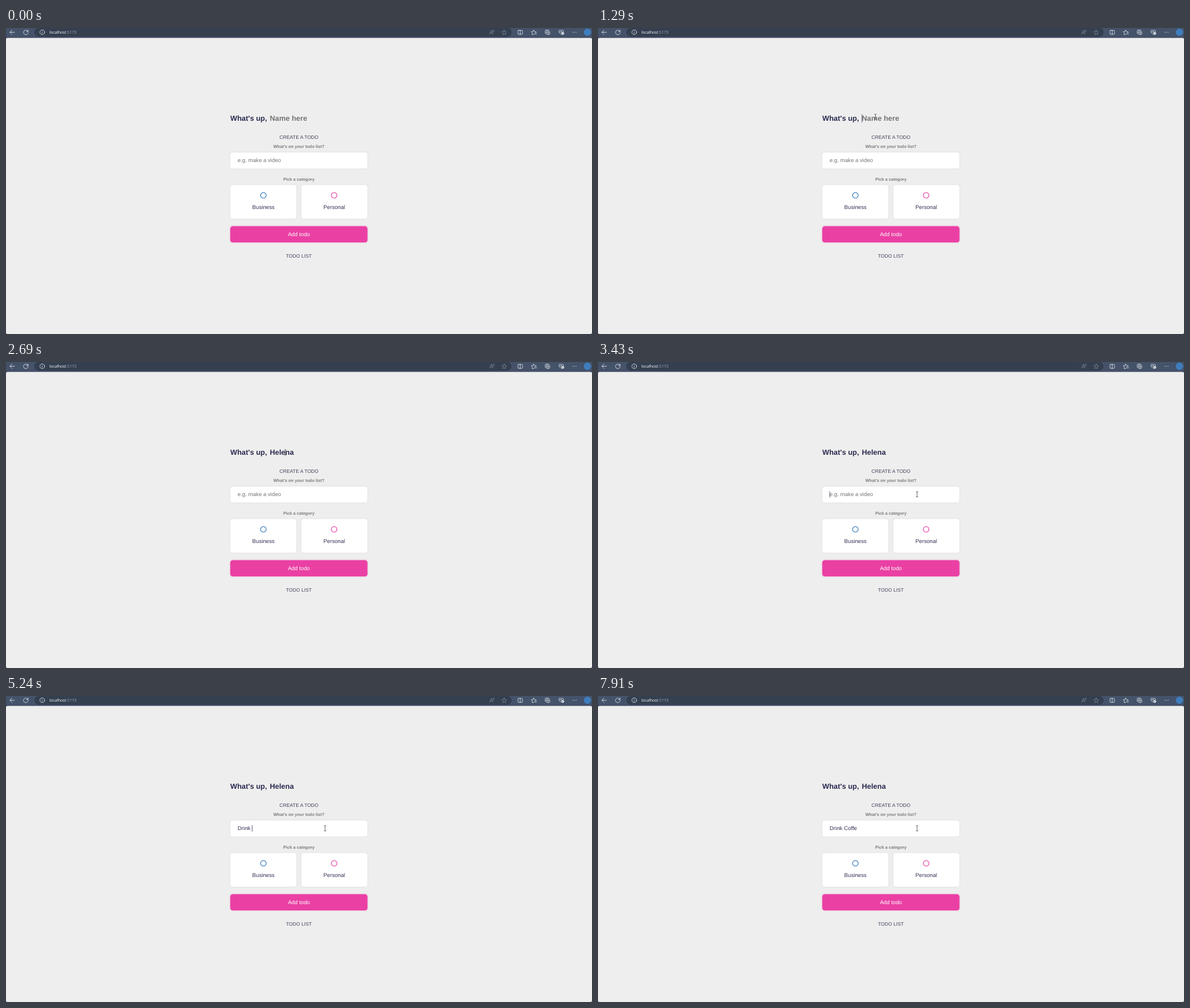
An HTML page for the animation above (8 s loop, 1034 px wide and 541 px high).

```html
<!DOCTYPE html>
<html lang="en">
<head>
<meta charset="utf-8">
<title>Todo list</title>
<style>
  html, body { margin: 0; width: 100%; height: 100%; overflow: hidden; background: #44536a; }
  svg { display: block; font-family: "Liberation Sans", Arial, sans-serif; text-rendering: geometricPrecision; }
  text { white-space: pre; fill: #313154; }
  .mid { text-anchor: middle; }
  .title { font-size: 12.92px; font-weight: bold; fill: #2b2b50; }
  .heading { font-size: 8.62px; letter-spacing: .04px; fill: #434360; }
  .label { font-size: 7.54px; font-weight: bold; fill: #7c7c7c; }
  .field { font-size: 9.69px; }
  .hint { fill: #757575; }
  .url { font: 7.1px "Open Sans", "Noto Sans", sans-serif; fill: #fff; }
  .card { fill: #fff; filter: drop-shadow(0 .5px .8px rgba(0, 0, 0, .1)); }
  .button { fill: #ea40a4; filter: drop-shadow(0 0 1.1px rgba(234, 64, 164, .65)); }
  .ring { fill: #fff; stroke-width: 1.2; }
  .icons { fill: none; stroke: #e4e8ee; stroke-width: .85; stroke-linecap: round; stroke-linejoin: round; }
  .dim { stroke: #7d8796; }
  .caret { fill: #313154; width: .8px; }
</style>
</head>
<body>
<svg width="1034" height="541" viewBox="0 0 1034 541">
  <!-- browser bar -->
  <rect y="16" width="1034" height="6" fill="#434b66"/>
  <rect x="50" y="-.5" width="842" height="16" rx="8" fill="#343f50"/>
  <rect y="17.6" width="1034" height="523.4" rx="3" fill="#eee"/>
  <text class="url" x="76.5" y="10.2">localhost<tspan fill="#a4acb8">:5173</tspan></text>
  <g class="icons">
    <path d="M15 7.5H7M10.7 3.6 6.8 7.5l3.9 3.9"/>
    <path d="M38.8 6.2A4.1 4.1 0 1 0 39.1 8M39 3.4v2.9h-2.9"/>
    <circle cx="64" cy="7.5" r="4.2"/>
    <path d="M64 7.2v2.3M64 5.4v.1"/>
    <path class="dim" d="M853.4 11 856.3 4l2.9 7M854.4 8.7h3.8M859 4.2q1 1 0 2.2M860.5 3.2q1.6 2 0 4"/>
    <path class="dim" d="m879 3.5 1.3 2.8 2.9.4-2.1 2.1.5 2.9-2.6-1.4-2.6 1.4.5-2.9-2.1-2.1 2.9-.4Z"/>
    <rect x="903.3" y="4.2" width="8" height="7" rx="1.2"/>
    <path d="M907.3 4v7.4"/>
    <path d="M931.6 11.2 928.3 11.7 928.8 8.7 926.8 6.7 929.7 6.2 931 3.5l1.3 2.7 3 .3M933 8.3h3M933 10.5h3"/>
    <rect x="953.5" y="5.5" width="6" height="6" rx="1.2"/>
    <path d="M951.6 9.5V5q0-1.4 1.4-1.4h4.5M956.5 7v3M955 8.5h3"/>
    <path d="M979.5 11.3 976 7.8q-1.4-2 .2-3.6 1.8-1.2 3.4.6 1.7-1.8 3.5-.5 1.2 1.1.7 2.7M977 7h2l1-1.2 1 2"/>
    <circle cx="982.4" cy="9.6" r="2.1" fill="#e4e8ee"/>
    <path d="m981.5 9.6.7.7 1.2-1.3" stroke="#44536a" stroke-width=".6"/>
    <path d="M1000 7.6h.1M1003 7.6h.1M1006 7.6h.1" stroke-width="1.3"/>
  </g>
  <circle cx="1026" cy="7.5" r="6.5" fill="#3f7dbd"/>

  <!-- form -->
  <text class="title" x="395.8" y="164">What's up,</text>
  <text class="title" id="nameHint" x="465.5" y="164" style="fill:#757575">Name here</text>
  <text class="title" id="name" x="465.5" y="164"></text>
  <text class="heading mid" x="516.9" y="195.9">CREATE A TODO</text>
  <text class="label mid" x="516.8" y="212.2">What's on your todo list?</text>
  <rect class="card" x="395.8" y="220" width="242" height="28.5" rx="4.3"/>
  <text class="field hint" id="todoHint" x="408.8" y="237.2">e.g. make a video</text>
  <text class="field" id="todo" x="408.8" y="237.2"></text>
  <text class="label mid" x="516.8" y="269.8">Pick a category</text>
  <rect class="card" x="395.8" y="277.5" width="116.6" height="59.7" rx="4.3"/>
  <rect class="card" x="521.2" y="277.5" width="116.6" height="59.7" rx="4.3"/>
  <circle class="ring" cx="454.2" cy="295.8" r="4.95" stroke="#2f76b8"/>
  <circle class="ring" cx="579" cy="295.8" r="4.95" stroke="#e640a2"/>
  <text class="field mid" x="454.2" y="320.1">Business</text>
  <text class="field mid" x="579.2" y="320.1">Personal</text>
  <rect class="button" x="395.8" y="350.6" width="241.9" height="28.5" rx="4.3"/>
  <text class="field mid" x="516.8" y="368.1" style="fill:#fff">Add todo</text>
  <text class="heading mid" x="516.8" y="405.9">TODO LIST</text>

  <rect class="caret" id="nameCaret" y="152.3" height="14.5"/>
  <rect class="caret" id="todoCaret" y="228.4" height="11.2"/>
  <g id="mouse">
    <path id="beam" d="M-1.9-4.6H-.6L0-4.2.6-4.6H1.9M0-4.2V4.2M-1.9 4.6H-.6L0 4.2.6 4.6H1.9" fill="none" stroke="#333" stroke-width=".8"/>
    <path id="arrow" d="M0 0V9.2L2.1 7.3 3.5 10.4 4.9 9.8 3.5 6.8H6.4Z" fill="#fff" stroke="#222" stroke-width=".6"/>
  </g>
</svg>
<script>
const LOOP = 8000, BLINK = 530, STEP = 66.6;
const $ = id => document.getElementById(id);
const show = (id, on) => $(id).setAttribute('visibility', on ? 'visible' : 'hidden');

// Evenly typed bursts of keys; "<" is a backspace
const burst = (start, gap, keys) => [...keys].map((key, i) => ({ time: start + i * gap, key }));

const fields = [
  { id: 'name', x: 465.5, focus: 1220, blur: 3300,
    strokes: [burst(1560, 0, 'H'), burst(1780, 95, 'elena')].flat() },
  { id: 'todo', x: 408.6, focus: 3300, blur: LOOP,
    strokes: [burst(4430, 200, 'Dr'), burst(4770, 70, 'in'), burst(5040, 200, 'k '),
      burst(5520, 235, 'Cog'), burst(6450, 130, '<f'), burst(6850, 400, 'fe')].flat() }
];

// Each move bends from the last resting place towards "via" and ends at "to"
const entry = { start: 190, x: 964, y: 432 };
const moves = [
  { start: 190, end: 590, via: [560, 262], to: [464, 219] },
  { start: 590, end: 1010, via: [448, 58], to: [489.5, 157] },
  { start: 2620, end: 3030, via: [508, 172], to: [563, 234] }
];

function drawField({ id, x, focus, blur, strokes }, t) {
  const typed = strokes.filter(s => s.time <= t);
  const value = typed.reduce((text, { key }) => key === '<' ? text.slice(0, -1) : text + key, '');
  const text = $(id);
  if (text.textContent !== value) text.textContent = value;
  show(id + 'Hint', !value);
  const since = t - (typed.length ? typed[typed.length - 1].time : focus);
  show(id + 'Caret', t >= focus && t < blur && Math.floor(since / BLINK) % 2 === 0);
  $(id + 'Caret').setAttribute('x', x + (value ? text.getComputedTextLength() : 0));
}

function mouseAt(t) {
  let { x, y } = entry;
  for (const { start, end, via, to } of moves) {
    const k = Math.min(1, Math.max(0, (t - start) / (end - start)));
    const bend = (a, b, c) => (1 - k) ** 2 * a + 2 * k * (1 - k) * b + k * k * c;
    x = bend(x, via[0], to[0]);
    y = bend(y, via[1], to[1]);
  }
  return [x, y];
}

function drawMouse(t) {
  const visible = t >= entry.start;
  const held = entry.start + Math.floor((t - entry.start) / STEP) * STEP;
  const [x, y] = mouseAt(held);
  const overName = x > 396 && x < 638 && y > 152 && y < 167;
  const overTodo = x > 396 && x < 638 && y > 218 && y < 249;
  const overText = overName || overTodo;
  show('beam', visible && overText);
  show('arrow', visible && !overText);
  $('mouse').setAttribute('transform', `translate(${x} ${y})`);
}

function frame() {
  const t = performance.now() % LOOP;
  fields.forEach(field => drawField(field, t));
  drawMouse(t);
  requestAnimationFrame(frame);
}
frame();
</script>
</body>
</html>
```
